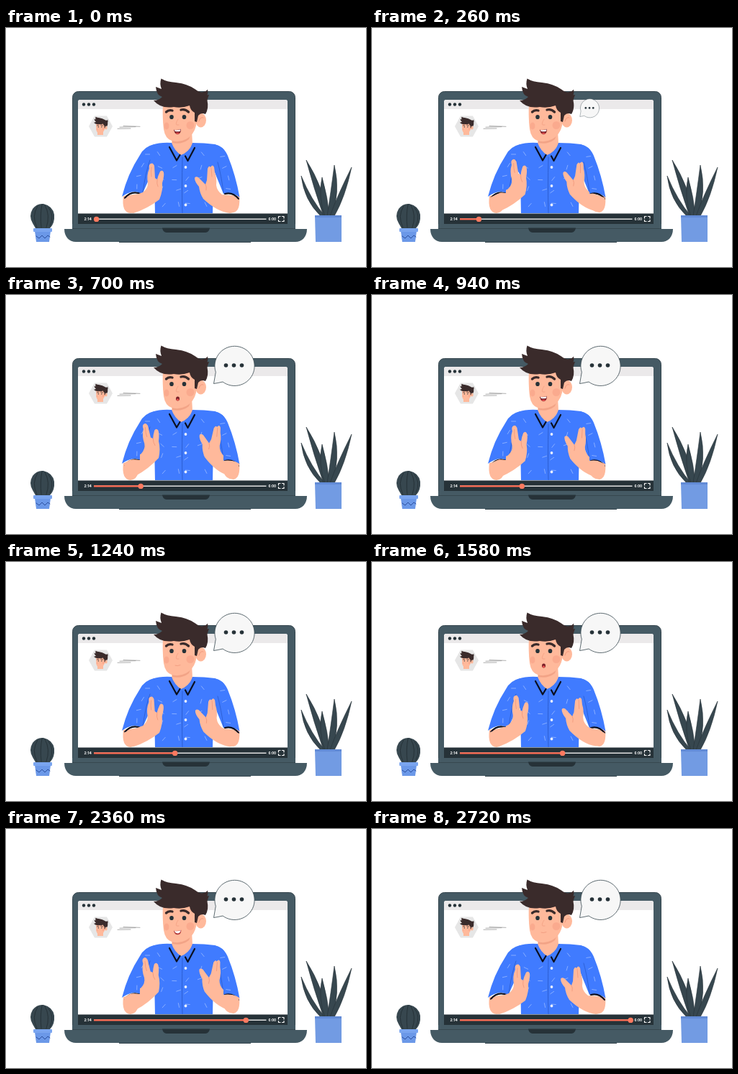
These frames come from a looping animation (500 px wide and 333 px high, 2.74 s). An HTML page:

```html
<!DOCTYPE html>
<html lang="en">
<head>
<meta charset="utf-8">
<title>Video lesson</title>
<style>
html, body { margin: 0; width: 100%; height: 100%; overflow: hidden; background: #fff; }
svg { display: block; width: 100%; height: 100%; }
text { font: 700 5px Inter, sans-serif; fill: #fff; }
.skin { fill: #ffb99b; }
.ink { fill: #263238; }
.hair { fill: #3a2b2b; }
.blue { fill: #407bff; }
.line { fill: none; stroke-linecap: round; stroke-linejoin: round; }
.marks { stroke: #b9d0ff; stroke-width: .6; }
</style>
</head>
<body>
<svg viewBox="0 0 500 333">
  <defs>
    <g id="head">
      <ellipse class="skin" cx="270.500" cy="128.500" rx="7.500" ry="10"/>
      <path class="line" d="M268 130Q270 123 274 125" stroke="#ed9276" stroke-width=".8"/>
      <path class="skin" d="M218 104Q217 126 219 141Q221 154 230 157Q240 160 250 155Q261 149 264 136L267 104Z"/>
      <g fill="#f79c83" opacity=".5">
        <circle cx="256" cy="135.500" r="5.500"/>
        <ellipse cx="223" cy="136.500" rx="3.500" ry="5"/>
      </g>
      <path class="hair" d="M205 101Q212 101 217 96Q209 94 208 82L216 85Q213 78 215.500 70.500Q223 75 236 76Q253 78 263 85.500Q268 89.500 272 89.500Q278 89 280 85.500Q281 90 279.500 93.500L282 93Q280 98 279.500 101Q282 112 277 120Q271 117 267 122L265 131L262 130L262 118Q256 115 255 108Q244 112 233 110Q215 113 205 101Z"/>
      <path class="line" d="M222.500 117Q226 113.500 231 115M243 114Q249 112.500 253.500 117" stroke="#3a2b2b" stroke-width="3.300"/>
      <ellipse class="ink" cx="230" cy="124" rx="2.800" ry="3.100"/>
      <ellipse class="ink" cx="247.500" cy="124" rx="2.800" ry="3.100"/>
      <path class="line" d="M239 127Q235 133 237 135L240 135" stroke="#f3a083" stroke-width=".8"/>
    </g>
    <!-- everything the cuffs leave uncovered -->
    <clipPath id="leftOpen"><path d="M186 165H245V262H155V235Q169 227 186 230Z"/></clipPath>
    <clipPath id="rightOpen"><path d="M302 165H245V262H330V237Q317 229 302 231Z"/></clipPath>
  </defs>

  <!-- cactus -->
  <path d="M37 272Q31 262 37 252Q43 244 52 245Q65 248 67 260Q68 272 61 279H41Z" fill="#37474f"/>
  <g class="line" stroke="#263238" stroke-width="1">
    <path d="M43 278Q35 262 44 248M49 278Q47 260 50 246M56 278Q62 261 54 247M61 276Q68 261 59 250"/>
  </g>
  <path d="M40 283H62L60 298H42Z" fill="#6b98e8"/>
  <rect x="38" y="279" width="26" height="5" rx="1" fill="#7aa5ef"/>
  <path class="line" d="M42 290l4 3 4-4 4 4 4-4 3 2" stroke="#2c4f9e" stroke-width="1"/>

  <!-- long-leaf plant -->
  <g id="leaves" fill="#37474f"></g>
  <path d="M429 261H466V298H430Z" fill="#729be3"/>
  <path d="M429 261H466V264H429Z" fill="#628bd6"/>

  <!-- laptop -->
  <rect x="92.500" y="88.500" width="309" height="200" rx="8" fill="#455a64" stroke="#37474f"/>
  <path d="M100 103Q100 100 103 100H388Q391 100 391 103V273H100Z" fill="#fff"/>
  <path d="M100 113V103Q100 100 103 100H388Q391 100 391 103V113Z" fill="#ebe9ea"/>
  <g class="ink"><circle cx="108" cy="106.500" r="2.200"/><circle cx="115" cy="106.500" r="2.200"/><circle cx="122" cy="106.500" r="2.200"/></g>

  <!-- profile -->
  <path d="M115 137L123 122.500H140L148 137L140 151.500H123Z" fill="#e6e6e6"/>
  <path class="skin" d="M127 143H135V149H127Z"/>
  <use href="#head" transform="translate(68.500 105.500) scale(.26)"/>
  <path class="line" d="M163 136.500L186 137.300M158 138.200L180 137.600M155 140.300L173 140" stroke="#8b8b8b" stroke-width=".7"/>

  <!-- presenter -->
  <path class="blue" d="M230 160Q214 159 203 163Q193 167 189 176L206 205L207 260H287L288 205L306 175Q302 165 290 162Q276 160 258 160Z"/>
  <path class="skin" d="M231 145L230 163Q234 173 243 177Q254 173 259 161L258 143Z"/>
  <path d="M231 157Q243 160 256 150L254 155Q244 163 231 160Z" fill="#f2a386"/>
  <path class="blue" d="M230 160L227 166L237 184L243 177Q234 171 230 160ZM259 160L262 168L253 185L248 177Q257 170 259 160Z"/>
  <path class="line" d="M227 166L237 184.500L241.500 177M262 167L252.500 185L249 178.500" stroke="#0b1020" stroke-width="2.200"/>
  <path class="line" d="M245 180Q244 225 245 258" stroke="#2757c4" stroke-width=".8"/>
  <g fill="#e8efff"><circle cx="249.500" cy="194" r="1.900"/><circle cx="249.500" cy="220" r="1.900"/><circle cx="249.500" cy="246.500" r="1.900"/></g>
  <g id="torsoMarks" class="line marks"></g>

  <path class="skin" d="M163 234Q160 257 173 258Q182 257 184 246V231ZM324 234Q326 255 316 257Q305 257 302 246V232Z"/>
  <path class="blue" d="M206 162Q192 165 186 177Q169 203 161 235Q169 229 178 228Q184 228 189 232L207 192ZM288 162Q302 164 308 178Q319 205 324.500 236Q316 229 302 231L287 194Z"/>
  <path class="line" d="M165 237Q175 225 189 232M304 231Q315 228 323 238" stroke="#0b1020" stroke-width="2.200"/>
  <path class="line" d="M200 184Q194 200 190 229M294 187Q299 205 302 229" stroke="#2757c4" stroke-width=".7"/>
  <g id="sleeveMarks" class="line marks"></g>
  <g clip-path="url(#leftOpen)"><g id="leftArm">
    <path class="skin" d="M164 238Q163 257 177 258Q196 252 213 239Q218 227 217 216Q220 206 219 201Q217 197 214 200Q211 206 210 211L207 209L206 192Q204 187 201 189Q198 190 199 196Q195 205 197 216Q197 224 190 229Z"/>
    <path class="line" d="M210 211Q209 217 211 221M202 194Q201 202 202 207" stroke="#ed9276" stroke-width=".7"/>
  </g></g>
  <g clip-path="url(#rightOpen)"><g id="rightArm">
    <path class="skin" d="M323 239Q324 257 311 258Q293 256 274 238Q269 230 268 221Q262 214 262 209Q263 206 267 208Q272 213 277 218L279 212L280 196Q282 191 284 194Q287 189 289 194L290 201Q293 209 292 219Q293 227 300 232Z"/>
    <path class="line" d="M277 218Q279 221 278 226M285 195L286 207" stroke="#ed9276" stroke-width=".7"/>
  </g></g>

  <use href="#head"/>
  <g id="mouths" transform="translate(0 .7)">
    <g>
      <path d="M233 141Q238 142 243 140Q243 147 238.500 147.500Q234 147 233 141Z" fill="#7a1f28"/>
      <path d="M234 141.300Q238 142.200 242.500 140.500L242 143Q238 144 234.500 143Z" fill="#fff"/>
      <path d="M235.500 146Q238 144 241 146Q238.500 148 235.500 146Z" fill="#ef5350"/>
    </g>
    <g>
      <ellipse cx="238.500" cy="143.800" rx="2.500" ry="3" fill="#7a1f28"/>
      <ellipse cx="238.500" cy="145.200" rx="1.600" ry="1.300" fill="#ef5350"/>
    </g>
    <g>
      <path d="M233 141Q238 142 243.500 140Q243 146.500 238.500 146.500Q234 146.500 233 141Z" fill="#b33a3a"/>
      <path d="M234 141.300Q238 142.300 242.800 140.600Q242 144.500 238.500 144.700Q235 144.500 234 141.300Z" fill="#fff"/>
    </g>
    <path class="line" d="M235 143.500Q238 144.500 242 143" stroke="#ed9276" stroke-width=".7"/>
  </g>

  <!-- player -->
  <path fill="#fff" d="M200 258H296V259H200Z"/>
  <rect class="ink" x="100" y="258.500" width="291" height="14.500"/>
  <text x="108.500" y="268">2:14</text>
  <text x="364.500" y="267.500" style="font-size:4.600px">6:00</text>
  <path d="M122 266.300H361.500" stroke="#e0e0e0" stroke-width="1.400"/>
  <path id="played" stroke="#ff6b52" stroke-width="2.200"/>
  <circle id="knob" cy="266.400" r="3.700" fill="#ff7a60"/>
  <path class="line" d="M378.500 265V262.500H381M383.500 262.500H386V265M386 267.500V269.500H383.500M381 269.500H378.500V267.500" stroke="#fff" stroke-width="1.200"/>

  <!-- keyboard base -->
  <path d="M92 273H402V282H92Z" fill="#455a64"/>
  <path d="M81 280H418C418 291 411 298 402 298H97C88 298 81 291 81 280Z" fill="#455a64"/>
  <path d="M92 279.500H402" stroke="#37474f" stroke-width="1"/>
  <path d="M217 278.500H283Q282 285 277 285H223Q218 285 217 278.500Z" class="ink"/>
  <path d="M157 298.500H340" stroke="#37474f" stroke-width="1"/>

  <g id="bubble">
    <path d="M288.500 123.500L291.300 107.500A27.600 27.600 0 1 1 301 121Q295 122.500 288.500 123.500Z" fill="#f7f7f7" stroke="#37474f" stroke-width=".8"/>
    <g class="ink"><circle cx="305.500" cy="98" r="2.800"/><circle cx="316.500" cy="98" r="2.800"/><circle cx="327.500" cy="98" r="2.800"/></g>
  </g>
</svg>
<script>
const LOOP = 2740;
const $ = id => document.getElementById(id);
const ease = p => Math.sin(Math.max(0, Math.min(1, p)) * Math.PI / 2) ** 2;

// Eased value through [time, value] keys.
function track(keys, t) {
  const i = keys.findIndex(k => k[0] > t);
  if (i < 0) return keys[keys.length - 1][1];
  const [t0, a] = keys[i - 1], [t1, b] = keys[i];
  return a + (b - a) * ease((t - t0) / (t1 - t0));
}

const lift = [[0, 0], [510, 1], [760, 1], [1390, 0], [1960, 1], [2300, 1], [2740, 0]];
const leftTilt = [[0, 0], [480, 1], [560, 1], [1270, 0.05], [1390, 0], [1960, 1], [2300, 1], [2740, 0]];
const SMILE = 0, ROUND = 1, TEETH = 2, CLOSED = 3;
const speech = [[0, SMILE], [640, ROUND], [840, SMILE], [1240, CLOSED], [1400, ROUND],
  [1700, SMILE], [1840, ROUND], [2100, TEETH], [2560, CLOSED]];

// Blades: base x, bend x, bend y, tip x, tip y, bulge.
const blades = [
  [440, 419, 240, 410, 206, 5], [444, 434, 222, 417, 184, 7], [446, 440, 236, 439, 208, 7],
  [449, 458, 230, 456, 191, 7], [453, 465, 236, 480, 194, 6]
];
$('leaves').innerHTML = blades.map(([x, bx, by, tx, ty, w]) =>
  `<path d="M${x - 3} 262Q${bx - w} ${by} ${tx} ${ty}Q${bx + w} ${by} ${x + 3} 262Z" stroke="#263238" stroke-width=".6"/>`).join('');

let seed = 11;
const rnd = () => (seed = seed * 16807 % 2147483647) / 2147483647;
const dash = (x, y) => {
  const a = rnd() * Math.PI, dx = 3 * Math.cos(a), dy = 3 * Math.sin(a);
  return `<path d="M${x - dx} ${y - dy}L${x + dx} ${y + dy}"/>`;
};
let torso = '', sleeves = '';
for (let y = 172; y < 252; y += 17)
  for (let x = 212; x < 282; x += 19) {
    const px = x + rnd() * 9, py = y + rnd() * 7;
    if (py > 190 || px < 222 || px > 266) torso += dash(px, py);
  }
for (let y = 176; y < 224; y += 15) {
  const out = (y - 174) * 0.32;
  sleeves += dash(192 - out + rnd() * 6, y) + dash(297 + out * 0.7 + rnd() * 5, y + 3);
}
$('torsoMarks').innerHTML = torso;
$('sleeveMarks').innerHTML = sleeves;

const mouths = [...$('mouths').children];

function draw(t) {
  const up = track(lift, t), tilt = track(leftTilt, t);
  $('leftArm').setAttribute('transform', `translate(${tilt} ${-5 * up}) rotate(${-11 * tilt} 172 246)`);
  $('rightArm').setAttribute('transform', `translate(0 ${-6 * up}) rotate(${9.5 * up} 312 246)`);

  const shape = speech.filter(s => s[0] <= t).pop()[1];
  mouths.forEach((m, i) => m.setAttribute('visibility', i === shape ? 'visible' : 'hidden'));

  const x = Math.min(359.2, 125.5 + t * 0.088);
  $('played').setAttribute('d', `M122 266.300H${x}`);
  $('knob').setAttribute('cx', x);

  $('bubble').setAttribute('transform', `translate(289 123.5) scale(${ease(t / 540)}) translate(-289 -123.5)`);
}

const start = performance.now();
function tick() {
  draw((performance.now() - start) % LOOP);
  requestAnimationFrame(tick);
}
draw(0);
requestAnimationFrame(tick);
</script>
</body>
</html>
```
